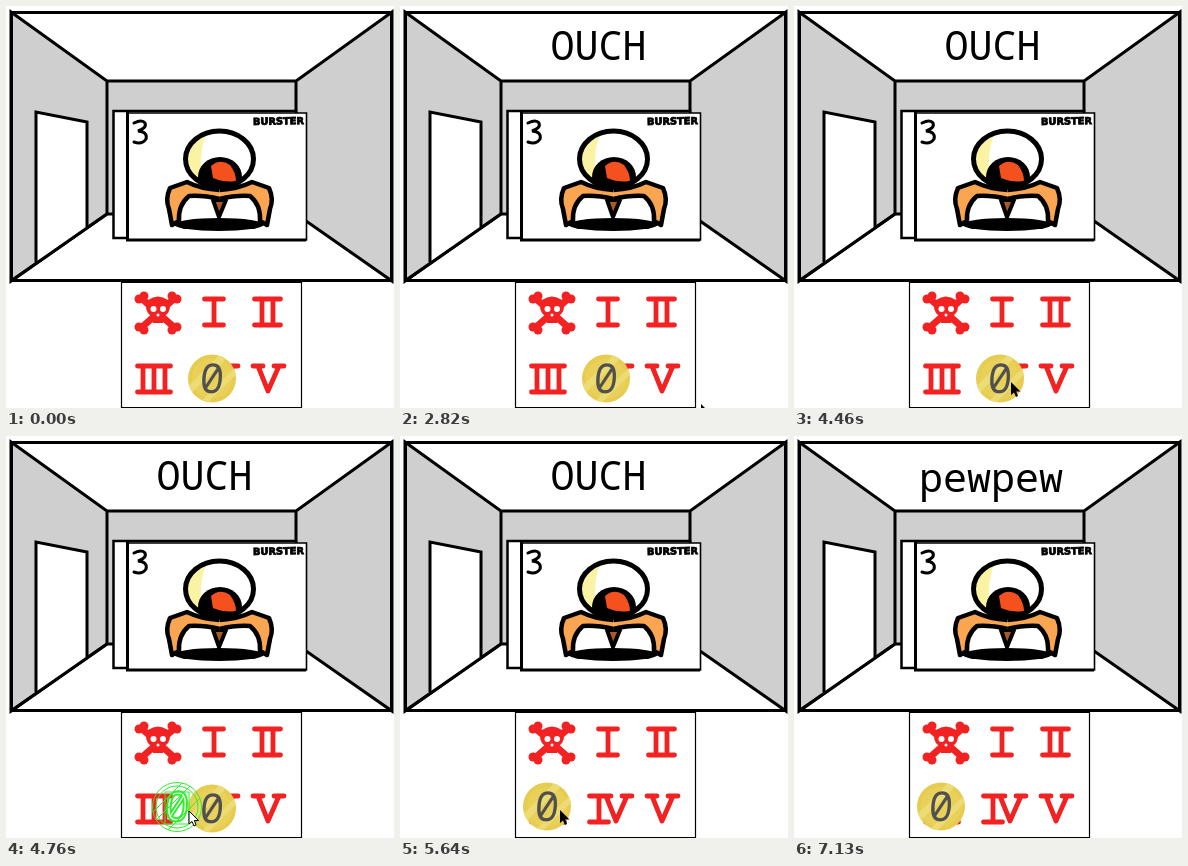
Recreate the animation shown at these times as an HTML page. Size 388 px wide and 402 px high, loop 8000 ms.

```html
<!DOCTYPE html>
<html lang="en">
<head>
<meta charset="utf-8">
<title>Card room</title>
<style>
  html, body { margin: 0; width: 100%; height: 100%; overflow: hidden; background: #fff; }
  svg { display: block; width: 100%; height: 100%; }
  text { font-family: "Noto Sans Mono", "DejaVu Sans Mono", monospace; text-anchor: middle; }
  .ink { stroke: #000; stroke-width: 3; fill: none; }
  .wall { fill: #cfcfcf; }
  .white { fill: #fff; }
  .red { stroke: #f32222; stroke-width: 4.8; fill: none; stroke-linecap: round; stroke-linejoin: round; }
  .leg { stroke: #000; stroke-width: 4.5; fill: #f9a552; stroke-linejoin: round; }
  .wire { stroke: #2cf02c; fill: none; }
  .title { font: bold 9.8px "DejaVu Sans", sans-serif; }
</style>
</head>
<body>
<svg viewBox="0 0 388 402">
  <defs>
    <clipPath id="disc"><circle r="24"/></clipPath>
    <clipPath id="head"><ellipse cx="213.5" cy="153" rx="34" ry="28"/></clipPath>
  </defs>

  <!-- room -->
  <g class="ink">
    <path class="wall" d="M5 6 101 75V208L5 275ZM386 6 290 75V208L386 275ZM101 75H290V208H101Z"/>
    <path d="M5.5 6.500H385.500V274.500H5.500Z"/>
    <path class="white" d="M30 256V106L81 116V221"/>
    <path d="M5 275 101 208"/>
  </g>

  <!-- card -->
  <path class="white" d="M107.500 105H290V232H107.500Z" stroke="#000" stroke-width="2.500"/>
  <path class="white" d="M121 107H300.500V234H121Z" stroke="#000" stroke-width="1.600"/>
  <path class="ink" d="M121.500 106V234H300"/>
  <path class="ink" stroke-linecap="round" d="M128 117Q136 113 139 117Q141 122 132 125Q142 126 140 133Q136 139 128 136"/>
  <text class="title" x="272.500" y="118.500" stroke="#000" stroke-width=".8" transform="rotate(-1 272 115)">BURSTER</text>

  <!-- creature -->
  <ellipse cx="213" cy="218.500" rx="45" ry="6.500"/>
  <path d="M207 194H220L213 211Z" fill="#a85a22" stroke="#000" stroke-width="4" stroke-linejoin="round"/>
  <g clip-path="url(#head)">
    <path class="white" d="M175 120H255V190H175Z"/>
    <path d="M175 120H205Q190 140 197 186H175Z" fill="#fbf3a4"/>
    <ellipse cx="214" cy="171" rx="22" ry="20"/>
    <path d="M205 160Q214 152 224 159Q230 167 230 175Q219 177 207 172Z" fill="#f4511e"/>
  </g>
  <ellipse class="ink" style="stroke-width:5" cx="213.500" cy="153" rx="34" ry="28"/>
  <path id="leg" class="leg" d="M213.500 184Q195 183 181 176L164 182Q159 193 163 203L166 219 173 215Q172 199 183 190Q197 189 213.500 193"/>
  <use href="#leg" transform="translate(427) scale(-1 1)"/>

  <!-- buttons -->
  <path class="white" d="M115.500 276.500H295.500V401.500H115.500Z" stroke="#000" stroke-width="1.200"/>
  <path id="numerals" class="red"/>
  <g id="skull" transform="translate(152 307)" fill="#f32222">
    <path d="M-17 -15 17 15M17 -15-17 15" stroke="#f32222" stroke-width="7"/>
    <path d="M-10 -13Q0 -20 10 -13Q15 -3 7 3L5 10H-5L-7 3Q-15 -3-10 -13Z"/>
    <g fill="#fff"><circle cx="-4.500" cy="-4" r="3"/><circle cx="5" cy="-4" r="3"/><circle cy="2" r="1.500"/></g>
  </g>

  <g id="coin">
    <circle r="24" fill="#e6cd52"/>
    <g clip-path="url(#disc)">
      <circle r="20" fill="#e9d159"/>
      <path d="M-24 8 8 -24H18L-24 18ZM-12 24 24 -12V-4L-4 24Z" fill="#eddb74"/>
    </g>
    <text y="14" font-size="41" fill="#505050" transform="skewX(-4)">0</text>
  </g>

  <g id="ghost" class="wire">
    <circle r="24.500"/><circle r="21"/>
    <path d="M-12 -15H12V17H-12ZM-24 5 5 -24M-21 13 13 -21M-9 23 23 -9"/>
    <text y="14" font-size="41" stroke-width="2" transform="skewX(-4)">0</text>
  </g>

  <text id="shout" font-size="40"></text>
  <path id="arrow" d="M0 0V13L3 10.500 5 15 7 14 5.300 9.500H9.500Z"/>
</svg>
<script>
const LOOP = 8000, STEP = 148.2;
const OUCH = 1470, ENTER = 2820, GRAB = 4610, DROP = 5640, LEAVE = 6230, PEW = 7130;
const $ = id => document.getElementById(id);

// numerals: n stems between two serifs, and a V with split serifs
function stems(x, y, n) {
  const w = 6 + 3.5 * n;
  let d = `M${x - w} ${y - 13}h${2 * w}M${x - w} ${y + 13}h${2 * w}`;
  for (let i = 0; i < n; i++) d += `M${x + 11 * (i - (n - 1) / 2)} ${y - 13}v26`;
  return d;
}
const vee = (x, y) => `M${x - 10} ${y - 13}l10 25 11 -25M${x - 15} ${y - 13}h10m11 0h10`;
$("numerals").setAttribute("d", stems(208, 306, 1) + stems(261.5, 306, 2) +
  stems(148, 373, 3) + stems(199, 373, 1) + vee(216, 373) + vee(262, 373));

// two knobs on each bone end
for (const sx of [-1, 1]) for (const sy of [-1, 1]) {
  const knob = (x, y) => `<circle cx="${sx * x}" cy="${sy * y}" r="4.5"/>`;
  $("skull").insertAdjacentHTML("beforeend", knob(19, 14) + knob(14, 17));
}

// pointer path: time, x, y
const path = [
  [ENTER, 301, 398], [2970, 288, 375], [3500, 221, 376], [4460, 217, 376],
  [4960, 160, 375], [DROP, 160, 374], [6080, 274, 399]
];

function pointer(t) {
  const i = Math.max(1, path.findIndex(p => p[0] > t));
  const [a, b] = t < path.at(-1)[0] ? [path[i - 1], path[i]] : [path.at(-1), path.at(-1)];
  const u = Math.max(0, (t - a[0]) / (b[0] - a[0] || 1));
  const e = u * u * (3 - 2 * u);
  return [1, 2].map(k => Math.round(a[k] + (b[k] - a[k]) * e));
}

const show = (el, on) => el.style.display = on ? "" : "none";
const place = (el, x, y) => el.setAttribute("transform", `translate(${x} ${y})`);

function draw(t) {
  const [x, y] = pointer(Math.floor(t / STEP) * STEP);
  const light = t >= GRAB && t < 5060;

  show($("arrow"), t >= ENTER && t < LEAVE);
  show($("ghost"), t >= GRAB && t < DROP);
  place($("arrow"), x, y);
  place($("ghost"), x - 12, y - 4);
  $("arrow").setAttribute("fill", light ? "#fff" : "#000");
  $("arrow").setAttribute("stroke", light ? "#000" : "none");

  if (t < DROP) place($("coin"), 206, 372.5);
  else place($("coin"), 147, 370.5);

  $("shout").textContent = t < OUCH ? "" : t < PEW ? "OUCH" : "pewpew";
  if (t < PEW) place($("shout"), 198.5, 53.5);
  else place($("shout"), 197, 56);
}

const start = performance.now();
function tick() {
  draw((performance.now() - start) % LOOP);
  requestAnimationFrame(tick);
}
tick();
</script>
</body>
</html>
```
